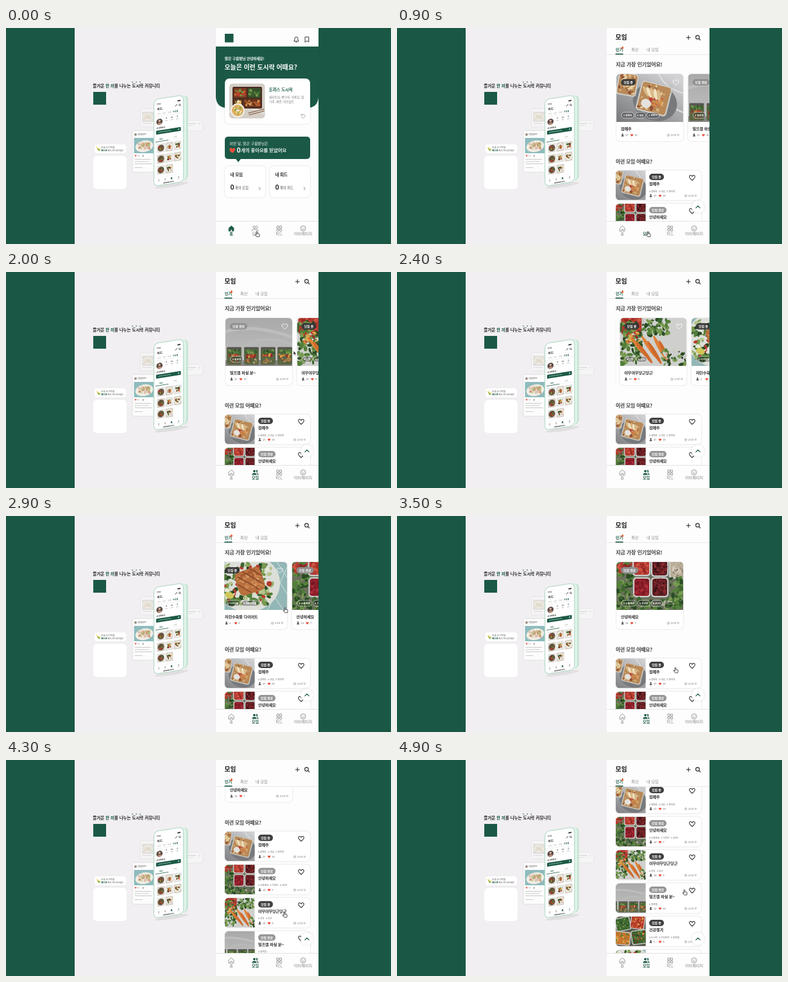
Animation of 600x338 px, one loop 5 s. Source, as an HTML page:

```html
<!DOCTYPE html>
<html lang="ko">
<head>
<meta charset="utf-8">
<title>도시락 커뮤니티</title>
<style>
html, body { margin: 0; width: 100%; height: 100%; overflow: hidden; background: #1a5745; }
svg { display: block; }
#stage { width: 100vw; height: 100vh; }
text { font-family: "Noto Sans CJK KR", "Noto Sans KR", "Noto Sans CJK JP", sans-serif; white-space: pre; }
.sh { filter: drop-shadow(0 .5px 1.2px rgba(0,0,0,.17)); }
</style>
</head>
<body>
<svg id="stage" viewBox="0 0 600 338" xmlns="http://www.w3.org/2000/svg"></svg>
<script>
const GREEN = '#1b5946', INK = '#222', GREY = '#808080', RED = '#ea4f3d';

// ---- drawing helpers
const rect = (x, y, w, h, fill, r = 0, extra = '') =>
  `<rect x="${x}" y="${y}" width="${w}" height="${h}" rx="${r}" fill="${fill}" ${extra}/>`;
const circle = (x, y, r, fill, extra = '') => `<circle cx="${x}" cy="${y}" r="${r}" fill="${fill}" ${extra}/>`;
const oval = (x, y, rx, ry, fill, a = 0) =>
  `<ellipse rx="${rx}" ry="${ry}" fill="${fill}" transform="translate(${x} ${y}) rotate(${a})"/>`;
// a hairline stroke stands in for the medium weight
const text = (x, y, size, str, fill = INK, weight = 400, anchor = 'start') =>
  `<text x="${x}" y="${y}" font-size="${size}" fill="${fill}" font-weight="${weight === 700 ? 700 : 400}" text-anchor="${anchor}"` +
  `${weight === 500 ? ` stroke="${fill}" stroke-width=".22"` : ''}>${str}</text>`;
const line = (d, color = INK, w = .9, fill = 'none') =>
  `<path d="${d}" fill="${fill}" stroke="${color}" stroke-width="${w}" stroke-linecap="round" stroke-linejoin="round"/>`;
const at = (x, y, body, extra = '') => `<g transform="translate(${x} ${y})" ${extra}>${body}</g>`;
const heart = (x, y, s, fill, stroke = 'none', w = 0) =>
  `<path transform="translate(${x} ${y}) scale(${s})" fill="${fill}" stroke="${stroke}" stroke-width="${w / s}"
   d="M0 .9C-.6 .4-1 .05-1-.4C-1-1-.25-1.1 0-.5C.25-1.1 1-1 1-.4C1 .05 .6 .4 0 .9z"/>`;
const measure = (str, size) =>
  [...str].reduce((n, c) => n + (c === ' ' ? .22 : c > '\u1000' ? .92 : .55), 0) * size;

// scattered food pieces inside a box
function bits(seed, n, x, y, w, h, colors, lo, hi) {
  let s = seed * 7919 + 17, out = '';
  const rnd = () => (s = (s * 16807) % 2147483647) / 2147483647;
  rnd();
  for (let i = 0; i < n; i++) {
    const r = lo + rnd() * (hi - lo);
    out += oval((x + rnd() * w).toFixed(1), (y + rnd() * h).toFixed(1), r.toFixed(1),
      (r * (.4 + rnd() * .4)).toFixed(1), colors[Math.floor(rnd() * colors.length)], Math.floor(rnd() * 180));
  }
  return out;
}
const LEAF = ['#3d6630', '#54803a', '#2a4a25', '#789a50'];
const FRUIT = ['#b93a2c', '#932724', '#cf7c34', '#dcae50'];
const MIX = [...LEAF, ...FRUIT];
const tray = (x, y, w, h, seed, colors, a = 0) =>
  `<g transform="rotate(${a} ${x + w / 2} ${y + h / 2})">` + rect(x, y, w, h, '#d3d5d2', 5, 'stroke="#a9adab" stroke-width=".7"') +
  rect(x + 2, y + 2, w - 4, h - 4, colors[0], 4) + bits(seed, 55, x + 4, y + 4, w - 8, h - 8, colors, 1.2, 3.2) + '</g>';

// ---- food pictures, 104 x 75 each
const GRAIN = ['#b98a58', '#d8b583', '#9a6a40', '#e6cfa4', '#8a4a35'];
const BEANS = ['#5a1c20', '#8c2b2e', '#3a1216', '#74242a'];
const POMEGRANATE = ['#8f1f2a', '#b93340', '#6c1620', '#a82a35'];
const PEPPER = ['#b43a2f', '#cf5543', '#932824'];
const jar = (x, i) => rect(x, 47, 23, 26, '#5a6644', 3) + bits(40 + i, 18, x + 3, 50, 17, 5, LEAF, 1.3, 3) +
  bits(50 + i, 14, x + 3, 57, 17, 5, FRUIT, 1.2, 2.6) + bits(60 + i, 12, x + 3, 64, 17, 6, ['#b9a684', '#7a4632', '#4f5a35', '#a87b45'], 1.2, 2.8) +
  rect(x, 45.5, 23, 3.6, '#55574f', 1.5);
const pics = [
  rect(0, 0, 104, 75, 'url(#marble)') + line('M66 0Q76 22 104 30M78 42Q90 56 104 60', '#dededf', 2) +
    oval(60, 44, 35, 29, '#77797c', 20) + tray(1, -2, 32, 36, 2, GRAIN, 10) +
    [0, 1, 2, 3].map(i => oval(12 + i * 4, 8 + i * 4, 6, 2.2, '#e6d2a6', -35)).join('') +
    tray(34, 14, 49, 48, 3, GRAIN, 14) + bits(8, 24, 52, 36, 20, 18, ['#c9513a', '#a83230', '#d88c43'], 1.3, 3) +
    [0, 1, 2, 3, 4].map(i => oval(46 + i * 5, 27 + i * 1.6, 9, 2.8, i % 2 ? '#efe2bf' : '#d9b988', 62 + i * 6)).join('') +
    oval(46, 46, 8, 7, '#e4e2dc', 20),
  rect(0, 0, 104, 75, 'url(#wall)') + line('M0 22Q40 8 104 30', '#bdbdbc', 5) + line('M30 44Q66 24 104 42', '#b9b9b8', 4) +
    rect(0, 66, 104, 9, '#868684') + [2, 29, 55, 81].map(jar).join(''),
  rect(0, 0, 104, 75, '#cfd0cd') + tray(0, -4, 36, 30, 11, PEPPER) + bits(12, 90, 0, 6, 34, 66, LEAF, 2, 5) +
    bits(15, 26, 8, 16, 24, 22, FRUIT, 1.6, 3.4) + bits(14, 60, 36, 2, 40, 26, LEAF, 1.8, 4.5) +
    [0, 1, 2, 3, 4, 5].map(i => oval(30 + i * 8, 46 + i % 2 * 8, 21, 3, i % 2 ? '#cf6a2c' : '#df8038', 50 + i * 3)).join('') +
    bits(16, 40, 66, 50, 36, 24, [...LEAF, '#c9cbc4'], 2, 4),
  rect(0, 0, 104, 75, '#93b7b6') + line('M88 0L104 24M80 12L104 50M76 42L98 75M104 8L74 75', '#c3d8d5', 1.2) +
    oval(43, 33, 50, 45, '#dcded8') + bits(21, 150, 0, 2, 80, 64, [...LEAF, '#93ad66', '#b4c48c'], 2, 5.5) +
    bits(23, 34, 4, 6, 76, 56, ['#e6e8d8', '#d5dcc0', '#b83d30'], 1.5, 4) +
    `<g transform="rotate(-18 46 30)">${rect(25, 11, 42, 38, '#b9703f', 8)}${bits(25, 40, 29, 15, 34, 30, ['#cc8650', '#a65c30', '#d89a66'], 2, 4)}` +
    `${line('M30 18L56 46M40 13L64 40M27 30L42 47M52 12L66 27', '#814524', 1.5)}</g>` +
    oval(14, 52, 7, 5, '#cfc65a', 20) + circle(76, 34, 4, '#b43a2c'),
  rect(0, 0, 104, 75, '#6a705c') + bits(31, 90, 0, 0, 26, 75, LEAF, 2, 5) + bits(32, 24, 2, 0, 24, 16, PEPPER, 2, 4) +
    tray(25, -12, 28, 34, 39, PEPPER) + tray(54, -10, 27, 33, 33, BEANS) + tray(82, -6, 28, 32, 38, ['#b8ad98', '#cfc6b2', '#988a74']) +
    tray(26, 24, 27, 31, 34, POMEGRANATE) + tray(54, 24, 27, 31, 35, BEANS) +
    bits(36, 60, 84, 26, 20, 46, LEAF, 2, 5) + bits(37, 60, 14, 58, 76, 16, [...LEAF, '#a5ac90'], 2, 4.5),
  rect(0, 0, 104, 75, '#55564a') + tray(12, 2, 38, 34, 71, LEAF, -12) + tray(50, -4, 36, 36, 72, FRUIT, 8) +
    tray(8, 38, 42, 34, 73, ['#c9742e', '#dcae50', '#54803a'], 6) + tray(52, 34, 40, 36, 74, MIX, -8)
];

// ---- groups shown in the app
const group = (title, open, people, likes, pic, crop, ...tags) => ({ title, open, people, likes, pic, crop, tags });
const lunch = group('점메추', 1, 27, 19, 0, 16, '점메추', '내일', '뭐먹지');
const hello = group('안녕하세요', 0, 14, 7, 4, 4, '소통해요', '직장인', '2030');
const carrot = group('야무야무당근당근', 1, 14, 9, 2, 4, '양양', '당근');
const prep = group('밀프렙 하실 분~', 0, 12, 10, 1, 22, '밀프렙');
const health = group('건강챙겨', 1, 5, 8, 5, 13, '도시락', '건강한끼', '밀프렙');
const lowCarb = group('저탄수화물 다이어트', 1, 2, 6, 3, 10, '다이어트', '저탄수화물');

const person = (x, y, c) => circle(x, y - 1.2, 1.1, c) + `<path d="M${x - 2} ${y + 2}q0-2 2-2t2 2z" fill="${c}"/>`;
const badge = (x, y, open) => {
  const s = open ? '모집 중' : '모집 완료', w = open ? 23 : 27;
  return rect(x, y, w, 10, open ? '#363636' : '#8f8f8f', 5, 'fill-opacity=".95"') + text(x + w / 2, y + 6.8, 4.8, s, '#fff', 500, 'middle');
};
const stats = (x, y, g, end) => person(x + 2.5, y - 1.6, '#333') + text(x + 7, y, 3.7, g.people, '#555') +
  heart(x + 17, y - 1.4, 2.1, RED) + text(x + 21.5, y, 3.7, g.likes, '#555') +
  circle(end - 17, y - 1.4, 1.7, 'none', 'stroke="#777" stroke-width=".5"') + line(`M${end - 17} ${y - 2.3}v1h.7`, '#777', .4) +
  text(end, y, 3.7, '2시간 전', '#666', 400, 'end');

const PITCH = 111.5;
function slide(g, i) {
  let x = 8, tags = '';
  for (const t of g.tags) {
    const s = '# ' + t, w = measure(s, 3.8) + 6;
    tags += rect(x, 60, w, 9, '#000', 4.5, 'fill-opacity=".28" stroke="#fff" stroke-width=".6"') + text(x + w / 2, 65.9, 3.8, s, '#fff', 700, 'middle');
    x += w + 2;
  }
  return at(342 + PITCH * i, 72, rect(0, 0, 104, 105, '#fff', 6, 'class="sh"') +
    `<g clip-path="url(#slideClip)"><svg width="104" height="75"><use href="#pic${g.pic}"/></svg></g>` +
    badge(7, 8, g.open) + tags + heart(92.5, 13.3, 4.4, 'none', '#fff', .9) +
    text(7, 88, 6, g.title, INK, 500) + stats(7, 97.2, g, 98));
}
function row(g, i) {
  let x = 52, tags = '';
  for (const t of g.tags) {
    tags += text(x, 33.6, 3.6, '# ' + t, '#666');
    x += measure('# ' + t, 3.6) + 2.6;
  }
  return at(341, 223 + 52 * i, rect(0, 0, 133, 46.5, '#fff', 6, 'class="sh"') +
    `<g clip-path="url(#rowClip)"><svg width="46.5" height="46.5" viewBox="${g.crop} 0 75 75"><use href="#pic${g.pic}"/></svg></g>` +
    badge(52, 5, g.open) + text(52, 23.4, 6, g.title, INK, 500) + tags + stats(52, 41, g, 126) +
    heart(119, 11.4, 4.3, 'none', INK, 1));
}

// ---- left promo panel
function phone() {
  let tiles = '';
  for (let i = 0; i < 8; i++) {
    const x = 4.5 + i % 3 * 13, y = 70.5 + Math.floor(i / 3) * 17.2;
    tiles += rect(x, y, 11.8, 14, i % 2 ? '#d8d2c8' : '#e2e2de', 1) + oval(x + 5.9, y + 7, 5, 5.2, i % 3 ? '#f4f2ec' : '#6a5646') +
      bits(80 + i, 18, x + 3, y + 4, 6, 6, MIX, .7, 1.7);
  }
  const nav = [7, 17, 27, 38].map((x, i) => rect(x - 1.2, 126, 2.4, 2.4, i === 2 ? GREEN : '#bbb', .8) + rect(x - 1.5, 129.6, 3, .6, '#bbb')).join('');
  return `<g transform="translate(231 112) skewY(-9)">` +
    rect(5.5, 1, 47, 133, '#c3e3d3', 7) + rect(3, .5, 47, 134, '#dff3e8', 7) +
    rect(-.5, 0, 46, 135.5, '#fff', 7, 'stroke="#b9dccb" stroke-width="1.3"') +
    text(4, 9, 3, '9:41', INK, 700) + rect(36, 7, 5, 1.6, INK, .6) + text(4.5, 17.6, 4.6, '피드', INK, 700) +
    line('M33 15.5l2.4-2.4', INK, .8) + circle(39.5, 14.5, 1.2, 'none', 'stroke="#222" stroke-width=".6"') + line('M40.4 15.4l.9.9', INK, .6) +
    ['인기', '최신', '모임', '프로필'].map((s, i) => text(5 + i * 8, 24.7, 3, s, i === 3 ? GREEN : '#999', i === 3 ? 700 : 400)).join('') +
    rect(0, 27, 45, .5, '#e4e4e4') + circle(8.2, 36, 4.8, '#5a4a44') + circle(8.2, 34.6, 1.7, '#d8b7a2') + oval(8.2, 39, 3, 1.8, '#b98a78') +
    [19, 27.5, 36].map((x, i) => text(x, 33, 2.8, [8, 12, 9][i], INK, 700, 'middle') + rect(x - 2, 35.5, 4, .7, '#aaa')).join('') +
    text(3.5, 46.8, 3, '도시락친구', INK, 700) + rect(3, 49.5, 38.5, 6, GREEN, 1) + rect(6, 52, 20, .8, '#a9c9bb') + circle(38, 52.3, .9, '#fff') +
    text(8, 64.5, 3, '피드', GREEN, 700) + text(30, 64.5, 3, '모임', '#999') + rect(2, 66.5, 20, .7, GREEN) + rect(22, 66.8, 21, .4, '#ddd') +
    tiles + rect(0, 123, 45, 11, '#fff', 5) + rect(1, 122.6, 43, .4, '#ddd') + nav + rect(14, 132.3, 17, .9, '#333', .4) + '</g>';
}
const promo = () => rect(107, 0, 220, 338, '#f1eff1') +
  [197, 203, 209].map(x => circle(x, 84.6, .8, GREEN)).join('') +
  `<text x="135.3" y="92.8" font-size="6.5" font-weight="700" fill="#222">즐거운 <tspan fill="${GREEN}">한 끼</tspan>를 나누는 도시락 커뮤니티</text>` +
  rect(136, 100, 20, 20, GREEN) +
  rect(138, 182, 49, 14, '#fff', 4) + line('M142 187l2 4 2.4-1.6', '#f0c23c', 1.6) + line('M143.4 189l2.2 3', '#6fae4f', 1.3) +
  text(148, 188, 3.7, '오늘 도시락을', '#555') +
  `<text x="148" y="193.4" font-size="3.6" fill="#555"><tspan font-weight="700" fill="${GREEN}">핸드폰</tspan>에서 만나보세요!</text>` +
  rect(136, 200, 52, 52, '#fff', 6) +
  at(210, 127, rect(0, 0, 26, 27, '#fafafa', 2) + rect(2, 4, 22, 16, '#d9d6d0', 1) + oval(11, 12, 8, 6, '#ece5d6') +
    bits(90, 10, 6, 9, 10, 6, ['#ddd0b4', '#c7cfae', '#dbb8a4'], 1.5, 3) + rect(3, 22, 14, 1, '#ccc'), 'class="sh" opacity=".6"') +
  at(197.5, 161, rect(0, 0, 37, 64, '#fff', 2) + circle(4.4, 5.8, 2, '#8f7c72') + rect(8, 4.4, 13, 1, '#666') + rect(8, 6.7, 9, .7, '#bbb') +
    rect(2, 11, 33, 24, '#7db3b4') + oval(18, 24, 14, 9, '#f2ece2', -12) + bits(91, 44, 9, 19, 18, 9, ['#d9b9a5', '#a9b36b', '#e3d9bf', '#c97f5c'], 1.2, 3) +
    heart(4.5, 39, 1.6, RED) + text(7.4, 40.3, 3, '12', '#777') + rect(15, 38, 2.4, 2.4, '#999', .8) +
    [44, 47.5, 51, 57].map((y, i) => rect(3, y, [25, 22, 27, 12][i], .9, '#bbb')).join(''), 'class="sh" opacity=".85"') +
  at(271, 145, rect(0, 0, 35, 15.5, '#fafafa', 2) + rect(13, 4, 12, 1, '#bbb') + rect(13, 7, 8, .8, '#ccc') + heart(30, 5, 1.4, 'none', '#bbb', .5), 'class="sh" opacity=".55"') +
  oval(258, 246, 26, 3, 'rgba(0,0,0,.07)', -9) + phone();

// ---- home screen
const bento = () => rect(0, 0, 56, 55, '#d3cec6') + line('M0 44Q30 30 56 48', '#dfdbd4', 4) +
  rect(5, 5, 46, 34, '#4a2b20', 2) + rect(7, 7, 20, 15, '#7e3b25', 1) + rect(29, 7, 20, 15, '#36502a', 1) + rect(7, 24, 13, 13, '#5a3a22', 1) + rect(22, 24, 27, 13, '#68341f', 1) +
  bits(1, 34, 9, 10, 16, 9, ['#c23a2b', '#d98a3a', '#6f9b3f'], 1, 2.3) + bits(2, 34, 31, 10, 16, 9, LEAF, 1, 2.5) +
  bits(4, 18, 10, 27, 8, 8, ['#efd98c', '#e8b745', '#fff3d0'], 1, 2.3) + bits(5, 34, 24, 27, 23, 7, ['#c58440', '#a8602a', '#d9a35c', '#cc3b2d'], 1, 2.4) +
  circle(13, 42, 11, '#f2efe8') + circle(13, 42, 9, '#dfae5b') + bits(6, 18, 8, 37, 10, 10, ['#f0dca5', '#7ea04b', '#fff'], 1, 2.2) +
  line('M30 46L54 40M31 49L54 43', '#7a4b2d', 1);
const counter = (x, name) => at(x, 216, rect(0, 0, 63, 49, '#fff', 6, 'class="sh"') + text(8.5, 16.4, 6.4, '내 ' + name, INK, 700) +
  text(8.5, 36.8, 10.5, '0', INK, 700) + text(15.5, 36.2, 5.4, '개의 ' + name, '#444') + line('M53.4 33l2 2.2-2 2.2', '#666', .8));
const home = () => rect(327, 0, 160, 338, '#fefdfe') +
  `<path d="M327 29h160v79q-1 17-18 17h-124q-17 0-18-17z" fill="${GREEN}"/>` +
  rect(341, 9, 13.5, 13.5, GREEN) +
  line('M449 20.5q1-1 1-4q0-2.6 2.4-2.6t2.4 2.6q0 3 1 4zM451.6 22h1.6') + line('M466.4 14h5.4v8l-2.7-2-2.7 2z') +
  text(341, 50, 5.6, '맑은 구름밭님 안녕하세요!', '#fff', 500) + text(340.5, 65, 9.9, '오늘은 이런 도시락 어때요?', '#fff', 700) +
  rect(341, 79, 133, 71, '#fff', 7, 'class="sh"') + at(348, 87, `<g clip-path="url(#bentoClip)">${bento()}</g>`) +
  text(410, 99, 6.3, '돈까스 도시락', GREEN, 500) + text(410, 110, 4.6, '돼지등심, 빵가루, 식용유, 밀', '#777') + text(410, 117.3, 4.6, '가루, 계란, 허브솔트', '#777') +
  line('M460.4 136.4a3 3 0 1 1-.2 2.6M460 134.6v2h2', '#999', .8) +
  `<path d="M357.5 204l4.5 6 4.5-6z" fill="${GREEN}"/>` + rect(341, 170, 133, 35, GREEN, 5) +
  text(348.5, 183, 5.8, '이번 달, 맑은 구름밭님은', '#fff') + heart(352.7, 191.7, 4.5, RED) +
  text(359.5, 195, 10.5, '0', '#fff', 700) + text(366, 194.3, 7.3, '개의 좋아요를 받았어요', '#fff', 500) +
  counter(341, '모임') + counter(411, '피드');

// ---- group screen
const groups = () => rect(327, 0, 160, 338, '#fefdfe') + `<g clip-path="url(#bodyClip)"><g id="scroll">` +
  text(341, 60.2, 7.9, '지금 가장 인기있어요!', INK, 500) +
  `<g clip-path="url(#trackClip)"><g id="track">${[lunch, prep, carrot, lowCarb, hello].map(slide).join('')}</g></g>` +
  text(341, 212, 7.6, '이런 모임 어때요?', INK, 500) + [lunch, hello, carrot, prep, health, lowCarb].map(row).join('') + '</g></g>' +
  rect(327, 41.2, 160, .9, '#e6e6e6') + text(340.5, 18.4, 9.7, '모임', '#111', 700) +
  line('M451.2 15h6M454.2 12v6', INK, 1) + circle(468.4, 14.4, 2.8, 'none', 'stroke="#222" stroke-width="1.1"') + line('M470.6 16.6l2.2 2.2', INK, 1.1) +
  text(340.7, 36.2, 6.2, '인기', GREEN, 700) + circle(351.3, 31.2, 1.6, '#e8622f') + oval(351.6, 30, .8, 1.6, '#e8622f', 15) +
  text(365, 36.2, 6.2, '최신', GREY) + text(389, 36.2, 6.2, '내 모임', GREY) + rect(340.5, 40, 12, 1.6, GREEN) +
  circle(469, 280, 10, '#fff', 'class="sh"') + line('M465.8 281.6l3.2-3.2 3.2 3.2', GREEN, 1.2);

// ---- bottom bar
const people = c => circle(387, 311.6, 1.9, c) + `<path d="M383.4 317.6q0-3.2 3.6-3.2t3.6 3.2z" fill="${c}"/>` +
  `<path d="M389.6 309.8q2.6-.4 2.6 1.9t-2.2 1.8q.8-1.6-.4-3.7zM390.6 314.3q2.8.2 2.8 3.3h-1.7q0-2.2-1.1-3.3z" fill="${c}"/>`;
const peopleLine = line('M383.4 317.6q0-3.2 3.6-3.2t3.6 3.2M385.2 311.6a1.8 1.8 0 1 0 3.6 0a1.8 1.8 0 1 0-3.6 0M389.8 309.8q2.2-.2 2.2 1.9t-2.2 1.8M391 314.6q2.2.4 2.2 3', GREY, .8);
const house = 'M347.4 313l3.8-3.4 3.8 3.4v4.8h-2.6v-2.6h-2.4v2.6h-2.6z';
const cells = [421.8, 426.3].map(x => [309.8, 314.3].map(y => rect(x, y, 3.2, 3.2, 'none', .5, `stroke="${GREY}" stroke-width=".8"`)).join('')).join('');
const label = (x, s, on) => text(x, 324.2, 6.1, s, on ? GREEN : GREY, on ? 700 : 400, 'middle');
const bar = () => rect(327, 302.4, 160, 36, '#fefdfe') + rect(327, 302, 160, .8, '#ddd') + cells +
  circle(463, 313.6, 4, 'none', `stroke="${GREY}" stroke-width=".8"`) + line('M461.2 314.6q1.8 2 3.6 0M461.6 312.3v.1M464.4 312.3v.1', GREY, .8) +
  label(425.5, '피드') + label(463, '마이페이지') +
  `<g id="barHome">${line(house, GREEN, .8, GREEN)}${label(351, '홈', 1)}${peopleLine}${label(388.5, '모임')}</g>` +
  `<g id="barGroups">${line(house, GREY, .8)}${label(351, '홈')}${label(388.5, '모임', 1)}<g id="peopleOn">${people(GREEN)}</g></g>`;

const clip = (id, x, y, w, h, r = 0) => `<clipPath id="${id}">${rect(x, y, w, h, '#000', r)}</clipPath>`;
document.getElementById('stage').innerHTML = `<defs>
  <linearGradient id="marble" x1="0" y1="1" x2=".8" y2="0"><stop stop-color="#77787b"/><stop offset="1" stop-color="#d2d2d4"/></linearGradient>
  <linearGradient id="wall" x2="0" y2="1"><stop stop-color="#a9a9a9"/><stop offset=".7" stop-color="#bababa"/></linearGradient>
  <clipPath id="slideClip"><path d="M0 75V6q0-6 6-6h92q6 0 6 6v69z"/></clipPath>` +
  clip('rowClip', 0, 0, 133, 46.5, 6) + clip('bentoClip', 0, 0, 55.5, 54.5, 5) + clip('bodyClip', 327, 42, 160, 260) + clip('trackClip', 340.5, 66, 146.5, 118) +
  pics.map((p, i) => `<g id="pic${i}">${p}</g>`).join('') + '</defs>' +
  rect(0, 0, 600, 338, '#1a5745') + promo() + `<g id="home">${home()}</g><g id="groups">${groups()}</g>` + bar() +
  `<g id="cursor"><g id="hand">${line('M-2-3.6q.8-1.2 1.6 0v2.8l2.6.5q1.1.3 1 1.4l-.6 3.1h-4l-2.4-3q-.2-1 .8-.8l1 .7z', '#222', .8, '#fff')}</g>` +
  `<g id="arrow">${line('M-1-3.4v6.4l1.6-1.4 1 2.4 1-.5-1-2.3h2z', '#fff', .6, '#222')}</g></g>`;

// ---- motion
const $ = id => document.getElementById(id);
const smooth = u => u * u * (3 - 2 * u);
const linear = u => u;
function track(keys, t, ease = smooth) {
  if (t <= keys[0][0]) return keys[0][1];
  for (let i = 1; i < keys.length; i++) {
    const [t0, a] = keys[i - 1], [t1, b] = keys[i];
    if (t <= t1) return a + (b - a) * ease((t - t0) / (t1 - t0));
  }
  return keys[keys.length - 1][1];
}
const SLIDES = [[1400, 0], [1850, 1], [2080, 1], [2450, 2], [2500, 2], [2800, 3], [2840, 3], [3215, 4]];
const SCROLL = [[3520, 0], [3700, 17], [4300, 111], [4900, 186], [5000, 192]];
const CX = [[920, 392], [1400, 449], [2100, 449], [2800, 436], [3500, 435], [4350, 435], [4850, 449]];
const CY = [[920, 322.5], [1400, 127], [2100, 127], [2850, 147], [3000, 147], [3400, 241], [4350, 242], [4850, 207]];
const show = (id, on) => $(id).setAttribute('display', on ? 'inline' : 'none');
const move = (id, x, y) => $(id).setAttribute('transform', `translate(${x.toFixed(2)} ${y.toFixed(2)})`);

function draw(t) {
  const inside = t >= 500, pointing = t < 1000 || t >= 2500;
  show('home', !inside);
  show('barHome', !inside);
  show('groups', inside);
  show('barGroups', inside);
  show('peopleOn', t >= 950);
  show('hand', pointing);
  show('arrow', !pointing);
  move('track', -PITCH * track(SLIDES, t), 0);
  move('scroll', 0, -track(SCROLL, t, linear));
  move('cursor', track(CX, t), track(CY, t));
}
const start = performance.now();
function tick() {
  draw((performance.now() - start) % 5000);
  requestAnimationFrame(tick);
}
tick();
</script>
</body>
</html>
```
